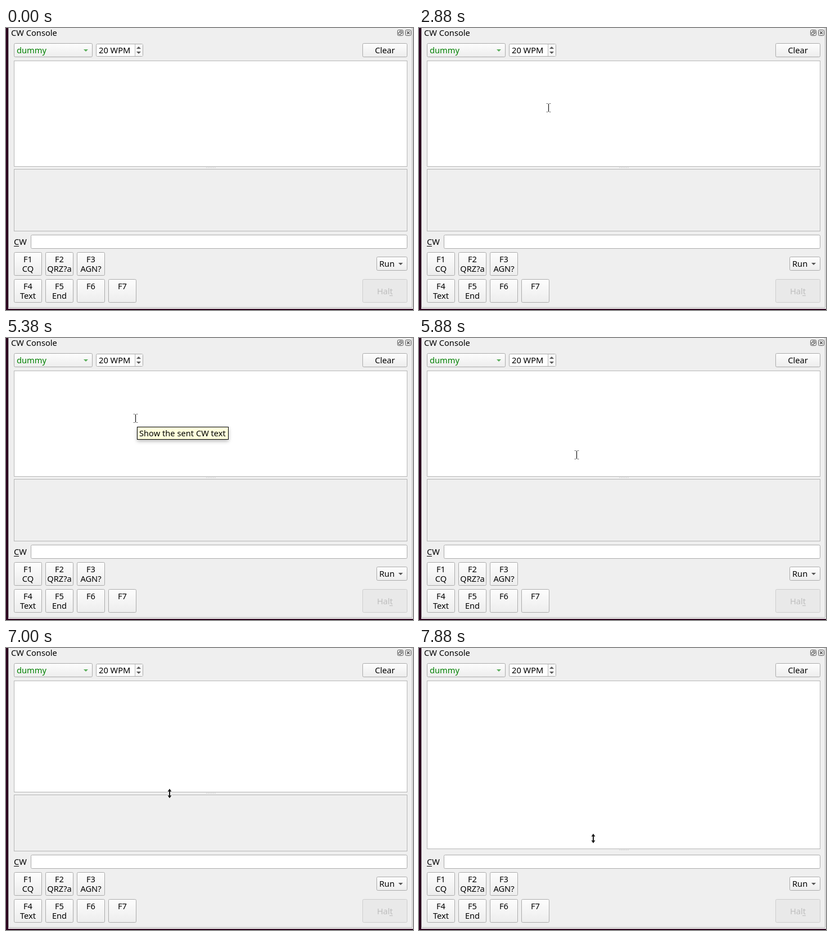
Write an HTML page that moves like this. It is 724x502 px and loops after 8000 ms.

```html
<!DOCTYPE html>
<html lang="en">
<head>
<meta charset="utf-8">
<title>CW Console</title>
<style>
html, body { margin: 0; width: 100%; height: 100%; overflow: hidden; background: #efefef; }
svg { display: block; width: 724px; height: 502px; }
text { font: 14.67px "Noto Sans", "Open Sans", sans-serif; fill: #000; white-space: pre; }
.mid { text-anchor: middle; }
.button { fill: url(#face); stroke: #ababab; }
.disabled { fill: #e9e9e9; stroke: #cdcdcd; }
.field { fill: #fff; stroke: #ababab; }
.pane { fill: #fff; stroke: #b6b6b6; }
.line { fill: none; stroke: #555; }
#tip { filter: drop-shadow(0 3px 3px #0004); }
</style>
</head>
<body>
<svg id="stage" viewBox="0 0 724 502">
  <defs>
    <linearGradient id="face" x2="0" y2="1">
      <stop stop-color="#fdfdfd"/><stop offset="1" stop-color="#ededed"/>
    </linearGradient>
  </defs>
  <rect width="724" height="502" fill="#efefef"/>
  <rect width="4" height="502" fill="#2c001e"/>
  <path d="M4.5 0V498M722.5 0V498M4 497.5H723" fill="none" stroke="#b9b9b9"/>
  <rect y="500" width="724" height="2" fill="#2c001e"/>
  <g id="widgets"></g>
  <rect id="upper" class="pane" x="14.5" y="58.5" width="699"/>
  <rect id="lower" class="pane" x="14.5" width="699" style="fill:#efefef"/>
  <path id="grip" d="M356.5 0H373" stroke="#b4b4b4" stroke-dasharray="1 2"/>
  <g id="tip">
    <rect x="233.5" y="158.5" width="162" height="22" fill="#ffffdc" stroke="#000"/>
    <text x="237" y="175">Show the sent CW text</text>
  </g>
  <g id="arrow">
    <path d="M0.5 0.5V14L3.7 11L6 16L8.3 15L6 10.2H10.3Z" fill="#111" stroke="#fff"/>
  </g>
  <g id="beam">
    <path d="M-3.5 -7.5H-.5M1.5 -7.5H4.5M-3.5 7.5H-.5M1.5 7.5H4.5" stroke="#777" fill="none"/>
    <path d="M.5 -7V7" stroke="#222" stroke-width="1.3"/>
  </g>
  <g id="resize">
    <path d="M0 -8.5L3.5 -3.5H1V3.5H3.5L0 8.5L-3.5 3.5H-1V-3.5H-3.5Z"
      fill="#1c1c1c" stroke="#fff" stroke-width="1.6" paint-order="stroke"/>
  </g>
</svg>
<script>
const $ = id => document.getElementById(id);

const box = (x, y, w, h, cls = 'button') =>
  `<rect class="${cls}" x="${x + .5}" y="${y + .5}" width="${w - 1}" height="${h - 1}" rx="2"/>`;
const label = (x, y, text, cls = '', color = '#000') =>
  `<text class="${cls}" x="${x}" y="${y}" style="fill:${color}">${text}</text>`;
// Triangle with a horizontal base; negative height points up
const triangle = (x, y, w, h, color = '#555') =>
  `<path d="M${x} ${y}h${w}l${-w / 2} ${h}z" fill="${color}"/>`;
const rule = (x, y, w, color = '#000') =>
  `<path d="M${x} ${y}h${w}" stroke="${color}"/>`;

const keys = [['F1', 'CQ'], ['F2', 'QRZ?a'], ['F3', 'AGN?'],
  ['F4', 'Text'], ['F5', 'End'], ['F6', ''], ['F7', '']];
const keyButton = ([name, action], i) => {
  const x = 14 + 56 * (i < 3 ? i : i - 3), y = i < 3 ? 399 : 447;
  return box(x, y, 50, 42) + label(x + 25, y + 18, name, 'mid') +
    label(x + 25, y + 35, action, 'mid');
};

$('widgets').innerHTML = [
  label(9, 14, 'CW Console'),
  '<rect class="line" x="696.5" y="3.5" width="10" height="10" rx="2"/>',
  '<path class="line" d="M700.5 7V5.5H704.5V9.5H703M698.5 7.5H702.5V11.5H698.5Z"/>',
  '<rect class="line" x="710.5" y="3.5" width="10" height="10" rx="2"/>',
  '<path class="line" stroke-width="1.5" d="M713 6L718 11M718 6L713 11"/>',
  box(14, 27, 140, 25), label(19, 45, 'dummy', '', '#008000'),
  triangle(138, 38, 8, 4, '#5aae5a'),
  box(160, 28, 84, 23, 'field'),
  '<path d="M230 29H243V50H230Z" fill="#f6f6f6"/>',
  '<path d="M229.5 29V50" stroke="#bdbdbd"/>',
  label(165, 45, '20 WPM'),
  triangle(232, 37, 8, -4), triangle(232, 42, 8, 4),
  box(634, 27, 80, 25), label(674, 45, 'Clear', 'mid'),
  label(14, 386, 'CW'), rule(14, 388.5, 9),
  box(44, 368, 670, 25, 'field'),
  ...keys.map(keyButton),
  box(659, 407, 55, 25), label(664, 425, 'Run'), triangle(698, 418, 8, 4),
  box(634, 447, 80, 42, 'disabled'),
  label(674, 474, 'Halt', 'mid', '#bdbdbd'), rule(682, 476.5, 6, '#bdbdbd'),
].join('');

// Pointer positions: start time, x, y
const moves = [
  [380, 124, 0], [500, 137, 15], [620, 165, 52], [750, 197, 97], [880, 217, 125], [1000, 225, 136],
  [2880, 230, 142], [5380, 230, 143], [5500, 235, 148], [5620, 248, 166], [5750, 266, 189],
  [5880, 280, 208], [6000, 285, 222], [6130, 287, 232], [6250, 289, 241], [6380, 291, 249],
  [7000, 291, 259], [7120, 293, 279], [7250, 296, 302], [7380, 299, 327], [7500, 302, 346],
  [7630, 303, 360], [7880, 310, 339],
];
const LOOP = 8000, SPLIT = 247, SPLIT_LIMIT = 282, COLLAPSE_AT = 325, COLLAPSED = 358;

const show = (el, visible) => el.style.display = visible ? '' : 'none';

function splitAt(time, y) {
  if (time < 7000) return SPLIT;
  if (time >= 7380 || y > COLLAPSE_AT) return COLLAPSED;
  return Math.min(y - 2, SPLIT_LIMIT);
}

function draw(now) {
  const time = now % LOOP;
  const move = moves.findLast(([start]) => start <= time);
  const [, x, y] = move || [0, 0, 0];

  const shape = time >= 6380 ? 'resize' : y < 58 ? 'arrow' : 'beam';
  for (const id of ['arrow', 'beam', 'resize']) {
    show($(id), move && id === shape);
    $(id).setAttribute('transform', `translate(${x} ${y})`);
  }
  show($('tip'), time >= 3750 && time < 5750);

  const split = splitAt(time, y);
  $('upper').setAttribute('height', split - 59);
  $('lower').setAttribute('y', split + 4.5);
  $('lower').setAttribute('height', Math.max(0, 357 - split));
  show($('lower'), split < COLLAPSED);
  $('grip').setAttribute('transform', `translate(0 ${split + 1.5})`);
  requestAnimationFrame(draw);
}
requestAnimationFrame(draw);
</script>
</body>
</html>
```
